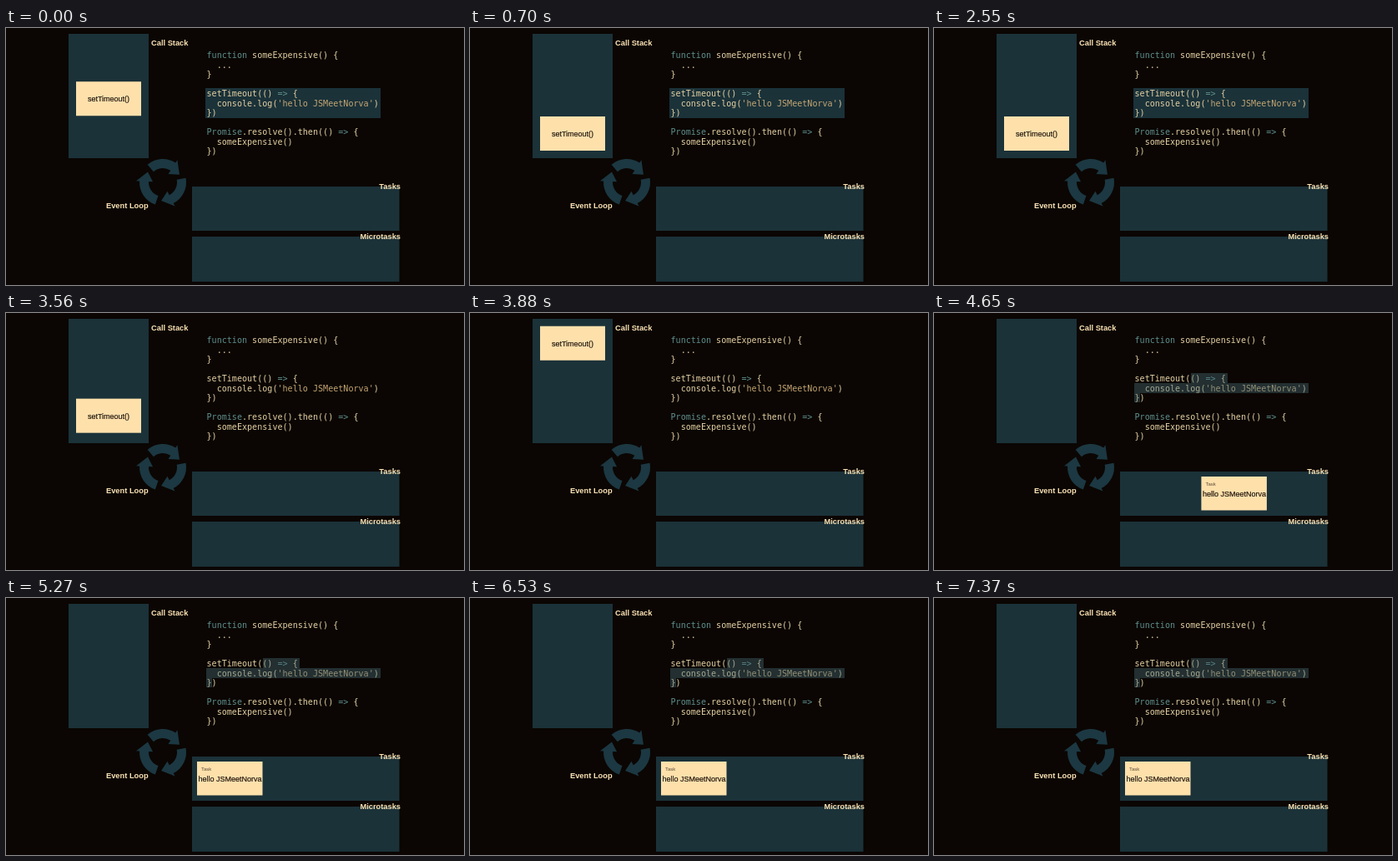
Animation, 549 px wide and 308 px high, one loop 8000 ms. Source, as an HTML page:

```html
<!DOCTYPE html>
<html lang="en">
<head>
<meta charset="utf-8">
<title>Event loop</title>
<style>
html, body { margin: 0; height: 100%; overflow: hidden; background: #0b0603; }
svg { display: block; width: 549px; height: 308px; }
.panel, #hiBlock { fill: #1b3239; }
#hiCallback { fill: rgb(72 108 118 / .4); }
#cycle { fill: #1c3842; }
.label { font: bold 9.3px "Liberation Sans", sans-serif; fill: #fbe3b5; }
.code { font: 10.08px "DejaVu Sans Mono", monospace; fill: #e4d0a3; white-space: pre; }
.key { fill: #5f8f8c; }
.str { fill: #c4a674; }
.card rect { fill: #fee0ab; }
.card text { font: 9px "Liberation Sans", sans-serif; fill: #20170f; stroke: #20170f; stroke-width: .2px; text-anchor: middle; }
.card .tag { font-size: 6px; fill: #5c4b38; stroke: none; text-anchor: start; }
</style>
</head>
<body>
<svg viewBox="0 0 549 308">
  <rect width="549" height="308" fill="#0b0603"/>
  <rect class="panel" x="75" y="7" width="96" height="149"/>
  <rect class="panel" x="223" y="190" width="248.5" height="53"/>
  <rect class="panel" x="223" y="250" width="248.5" height="54"/>
  <g id="cycle" transform="translate(188 185)"></g>

  <rect id="hiBlock" x="239" y="72" width="210" height="36"/>
  <g id="code"></g>
  <path id="hiCallback" d="M308 72H352V84H449V96H247V107H240V84H308Z"/>

  <g class="label">
    <text x="174" y="21">Call Stack</text>
    <text x="120" y="216">Event Loop</text>
    <text x="473" y="193" text-anchor="end">Tasks</text>
    <text x="473" y="253" text-anchor="end">Microtasks</text>
  </g>

  <g id="call" class="card">
    <rect width="78" height="41"/>
    <text x="39" y="24">setTimeout()</text>
  </g>
  <g id="task" class="card">
    <rect width="78.5" height="40.5"/>
    <text class="tag" x="5" y="10.5">Task</text>
    <text x="39.5" y="23.5">hello JSMeetNorva</text>
  </g>
</svg>
<script>
const $ = id => document.getElementById(id);

// ~word~ marks a keyword, 'word' a string
const lines = [
  "~function~ someExpensive() {", "  ...", "}", "",
  "setTimeout(() ~=>~ {", "  console.log('hello JSMeetNorva')", "})", "",
  "~Promise~.resolve().then(() ~=>~ {", "  someExpensive()", "})"
];
const paint = s => s
  .replace(/=>/g, "=&gt;")
  .replace(/'.*?'/g, '<tspan class="str">$&</tspan>')
  .replace(/~(.*?)~/g, '<tspan class="key">$1</tspan>');
$("code").innerHTML = lines.map((s, i) =>
  `<text class="code" x="240.5" y="${36 + 11.5 * i}">${paint(s)}</text>`).join("");

// Three clockwise arrows around the centre
const at = (r, deg) => {
  const a = deg * Math.PI / 180;
  return `${(r * Math.cos(a)).toFixed(2)} ${(r * Math.sin(a)).toFixed(2)}`;
};
$("cycle").innerHTML = [-25, 95, 215].map(tip => {
  const tail = tip - 106, neck = tip - 32;
  return `<path d="M${at(28, tail)}A28 28 0 0 1 ${at(28, neck)}L${at(32, neck)}` +
    `L${at(22, tip)}L${at(12, neck)}L${at(17, neck)}A17 17 0 0 0 ${at(17, tail)}Z"/>`;
}).join("");

const LOOP = 8000, STEP = 77.5;
const progress = (t, start, length) => Math.min(1, Math.max(0, (t - start) / length));
const ease = (t, start, length) => (1 - Math.cos(Math.PI * progress(t, start, length))) / 2;
const place = (id, x, y) => $(id).setAttribute("transform", `translate(${x} ${y})`);

function draw(now) {
  // The picture advances in even steps
  const t = Math.floor((now % LOOP + 7) / STEP) * STEP;
  const dropIn = ease(t, -740, 1150), liftOut = ease(t, 3502, 660);
  place("call", 84, -42 + 148 * dropIn - 150 * liftOut);
  place("task", 549 - 320 * ease(t, 3900, 1170), 196);
  $("hiBlock").setAttribute("opacity", 1 - progress(t, 3080, 420));
  $("hiCallback").setAttribute("opacity", progress(t, 3900, 340));
}

const begin = performance.now();
function tick() {
  draw(performance.now() - begin);
  requestAnimationFrame(tick);
}
tick();
</script>
</body>
</html>
```
